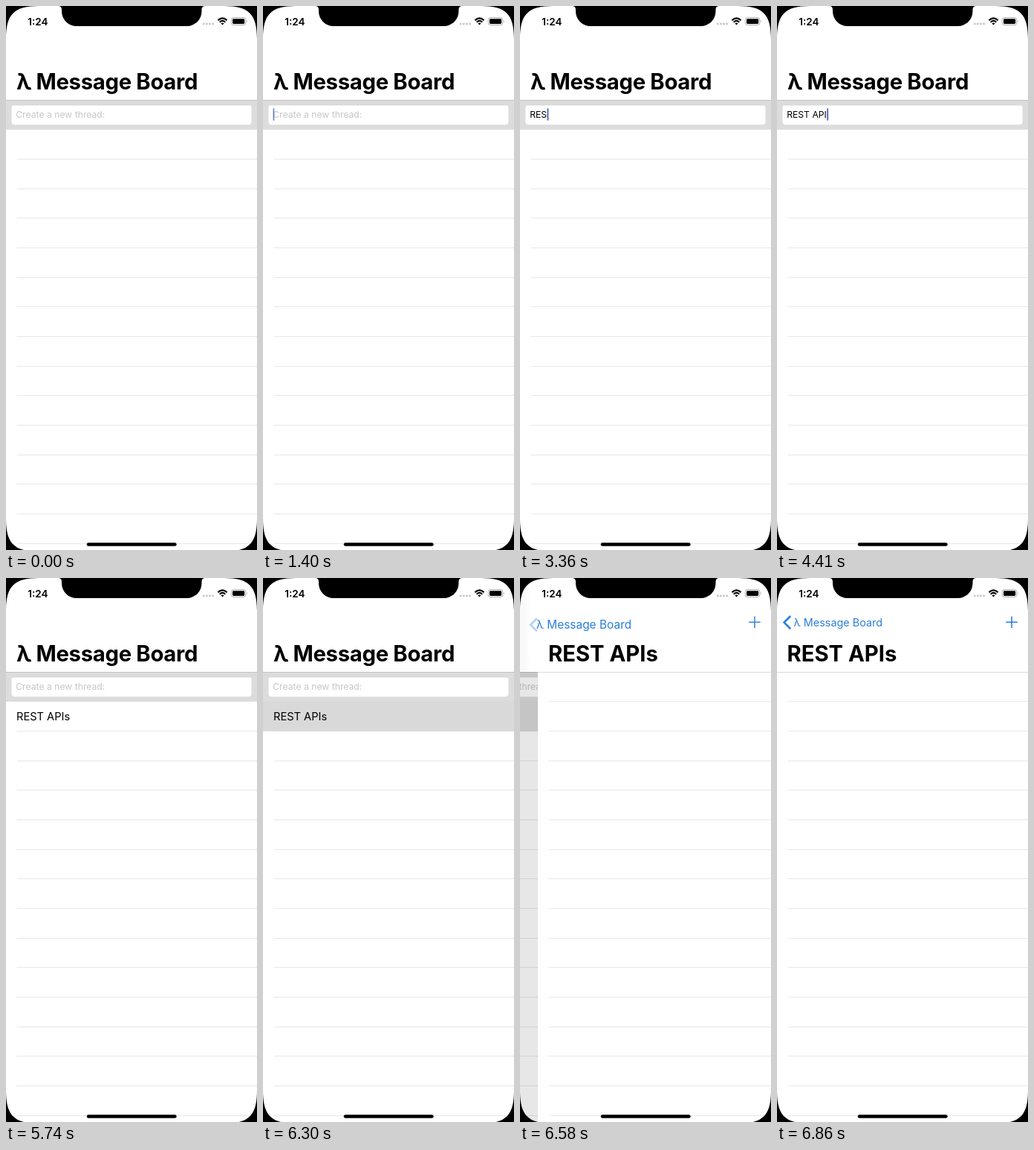
These frames come from a looping animation (338 by 730 pixels, 8000 ms). An HTML page:

```html
<!DOCTYPE html>
<html lang="en">
<head>
<meta charset="utf-8">
<title>Message Board</title>
<style>
  html, body { margin: 0; width: 100%; height: 100%; overflow: hidden; background: #000; }
  svg { display: block; width: 338px; height: 730px; font-family: Inter, Roboto, sans-serif; }
  text { white-space: pre; }
  .title { font-size: 29.3px; font-weight: 700; }
  .label { font-weight: 700; letter-spacing: -.011em; }
  .body { font-size: 14.65px; }
  .field { font-size: 12.2px; }
  .rule { stroke: #e8e8e8; stroke-width: 1; }
  .tint { stroke: #2b7fd8; fill: none; }
</style>
</head>
<body>
<svg viewBox="0 0 338 730">
  <defs>
    <linearGradient id="barFade" gradientUnits="userSpaceOnUse">
      <stop id="barStart" offset=".2" stop-color="#fff"/>
      <stop offset=".6" stop-color="#fff"/>
    </linearGradient>
    <linearGradient id="edge">
      <stop offset="0" stop-opacity="0"/>
      <stop offset="1" stop-opacity=".08"/>
    </linearGradient>
  </defs>
  <rect width="338" height="730" fill="#fff"/>

  <g id="board">
    <g id="boardRules"></g>
    <rect y="126" width="338" height="40" fill="#dcdcdc"/>
    <path d="M0 126.5H338" stroke="#c2c2c2"/>
    <rect x="7.5" y="133" width="323" height="26.3" rx="4" fill="#fff"/>
    <path d="M10 133H328" stroke="#cfcfcf" stroke-width=".7"/>
    <text id="hint" class="field" x="13.2" y="150" fill="#c6c6c9">Create a new thread:</text>
    <text id="typed" class="field" x="13.2" y="150"></text>
    <rect id="caret" y="137.3" width="1.8" height="16.4" rx=".8" fill="#4a63b8"/>
    <rect id="rowTap" y="166" width="338" height="39.7" fill="#d9d9d9"/>
    <text id="row" class="body" x="14" y="191">REST APIs</text>
  </g>

  <rect id="dim" height="730"/>
  <rect id="shadow" y="126" width="5" height="604" fill="url(#edge)"/>

  <g id="thread">
    <rect width="338" height="730" fill="#fff"/>
    <g id="threadRules"></g>
  </g>

  <rect id="bar" width="338" height="126" fill="url(#barFade)"/>
  <path id="barLine" stroke="#dadada"/>
  <text id="bigLabel" class="label">λ Message Board</text>
  <text id="backLabel" fill="#2b7fd8">λ Message Board</text>
  <path id="chevron" class="tint" stroke-width="2.7" d="M18.2 51L9.6 59.6L18.2 68.2"/>
  <text id="threadTitle" class="title" y="112">REST APIs</text>
  <path id="plus" class="tint" stroke-width="1.6" d="M308.3 59.2H323.7M316 51.5V66.9"/>

  <!-- status bar -->
  <text x="29.3" y="25.6" font-size="13.5" font-weight="600">1:24</text>
  <path d="M266.3 24H281" stroke="#c6c6c6" stroke-width="2.9" stroke-linecap="round" stroke-dasharray="0 4.1"/>
  <g fill="none" stroke="#000" stroke-width="2.1">
    <path d="M285.4 19.2Q291.5 13.4 297.6 19.2"/>
    <path d="M287.7 21.7Q291.5 18.2 295.3 21.7"/>
  </g>
  <path d="M289.4 23.3Q291.5 21.5 293.6 23.3L291.5 25.6Z"/>
  <rect x="303.4" y="15.7" width="19.4" height="9.8" rx="2.7" fill="none" stroke="#a2a2a2" stroke-width=".9"/>
  <rect x="305" y="17.3" width="16.2" height="6.6" rx="1.4"/>
  <path d="M324 19Q325.6 20.6 324 22.3Z" fill="#a2a2a2"/>

  <!-- device frame; the screen runs slightly past the bottom edge -->
  <path d="M71 0Q75 .5 75 5V7A20 20 0 0 0 95 27H243.500A20 20 0 0 0 263.500 7V5Q263.500 .5 267.500 0Z"/>
  <path fill-rule="evenodd" d="M0 0H338V732H0Z
    M0 44C0 11 11 0 44 0H294C327 0 338 11 338 44V688C338 721 327 732 294 732H44C11 732 0 721 0 688Z"/>
  <rect x="108.700" y="720.200" width="121" height="4.600" rx="2.300"/>
</svg>
<script>
  const LOOP = 8000, STEP = 70, W = 338, PUSH = 6323;
  const MESSAGE = 'REST APIs';
  const keyTimes = [3080, 3220, 3360, 3500, 3780, 3920, 4200, 4410, 4970];
  const SENT = 5390, LISTED = 5740, TAPPED = 6300, SETTLED = 6860;
  const caretSteps = [
    [0, 0], [840, 1],
    [1400, .75], [1470, .5], [1540, .25], [1610, 0], [1960, .5], [2030, 1],
    [2450, .75], [2520, .5], [2590, .25], [2660, 0], [2940, .5], [3010, 1],
    [SENT, 0]
  ];

  const el = {};
  document.querySelectorAll('[id]').forEach(n => el[n.id] = n);
  const set = (node, attrs) => {
    for (const key in attrs) node.setAttribute(key, attrs[key]);
  };
  const clamp = v => Math.min(1, Math.max(0, v));
  const lerp = (a, b, p) => a + (b - a) * p;
  const show = (node, on) => set(node, { opacity: +on });

  function addRules(group, first) {
    let d = '';
    for (let i = first; i <= 15; i++) d += `M14.5 ${Math.floor(126 + i * 39.67) + .5}H${W}`;
    group.innerHTML = `<path class="rule" d="${d}"/>`;
  }
  addRules(el.boardRules, 2);
  addRules(el.threadRules, 1);

  // Critically damped spring, 0 to 1
  function pushProgress(t) {
    const s = Math.max(0, t - PUSH) * .0168;
    return t >= SETTLED ? 1 : 1 - (1 + s) * Math.exp(-s);
  }

  function drawField(t) {
    const count = t < SENT ? keyTimes.filter(k => k <= t).length : 0;
    el.typed.textContent = MESSAGE.slice(0, count);
    show(el.hint, !count);
    const width = count ? el.typed.getComputedTextLength() + .4 : .3;
    const level = caretSteps.filter(s => s[0] <= t).pop()[1];
    set(el.caret, { x: 13.2 + width, opacity: level });
    show(el.row, t >= LISTED);
    show(el.rowTap, t >= TAPPED);
  }

  function drawPush(p) {
    const rest = 1 - p, x = W * rest, moving = p > 0;
    set(el.board, { transform: `translate(${-.3 * W * p})` });
    set(el.dim, { width: x, opacity: .1 * p });
    set(el.shadow, { x: x - 5, opacity: moving ? rest : 0 });
    set(el.thread, { transform: `translate(${x})` });
    show(el.bar, moving);
    set(el.barFade, { x1: 0, x2: Math.max(x, .1) });
    set(el.barStart, { 'stop-opacity': p ** 4 });
    set(el.barLine, { opacity: +moving, d: `M${x} 126.5H${W}` });

    const place = {
      x: lerp(14.2, 22.6, p),
      y: lerp(112, 65, p),
      'font-size': lerp(29.3, 14.4, p)
    };
    set(el.bigLabel, {
      ...place,
      fill: `rgb(${43 * p},${127 * p},${216 * p})`,
      opacity: clamp(1 - (p - .45) * 2.1)
    });
    set(el.backLabel, { ...place, opacity: clamp((p - .6) / .32) });

    set(el.chevron, {
      transform: `translate(${rest * 65} ${rest * 45})`,
      opacity: clamp((p - .89) * 9)
    });
    set(el.threadTitle, { x: 13.4 + x * (1 + .32 * rest), opacity: +moving });
    set(el.plus, { opacity: p });
  }

  function frame(now) {
    const t = Math.floor((now % LOOP) / STEP) * STEP;
    drawField(t);
    drawPush(pushProgress(t));
    requestAnimationFrame(frame);
  }
  frame(performance.now());
</script>
</body>
</html>
```
